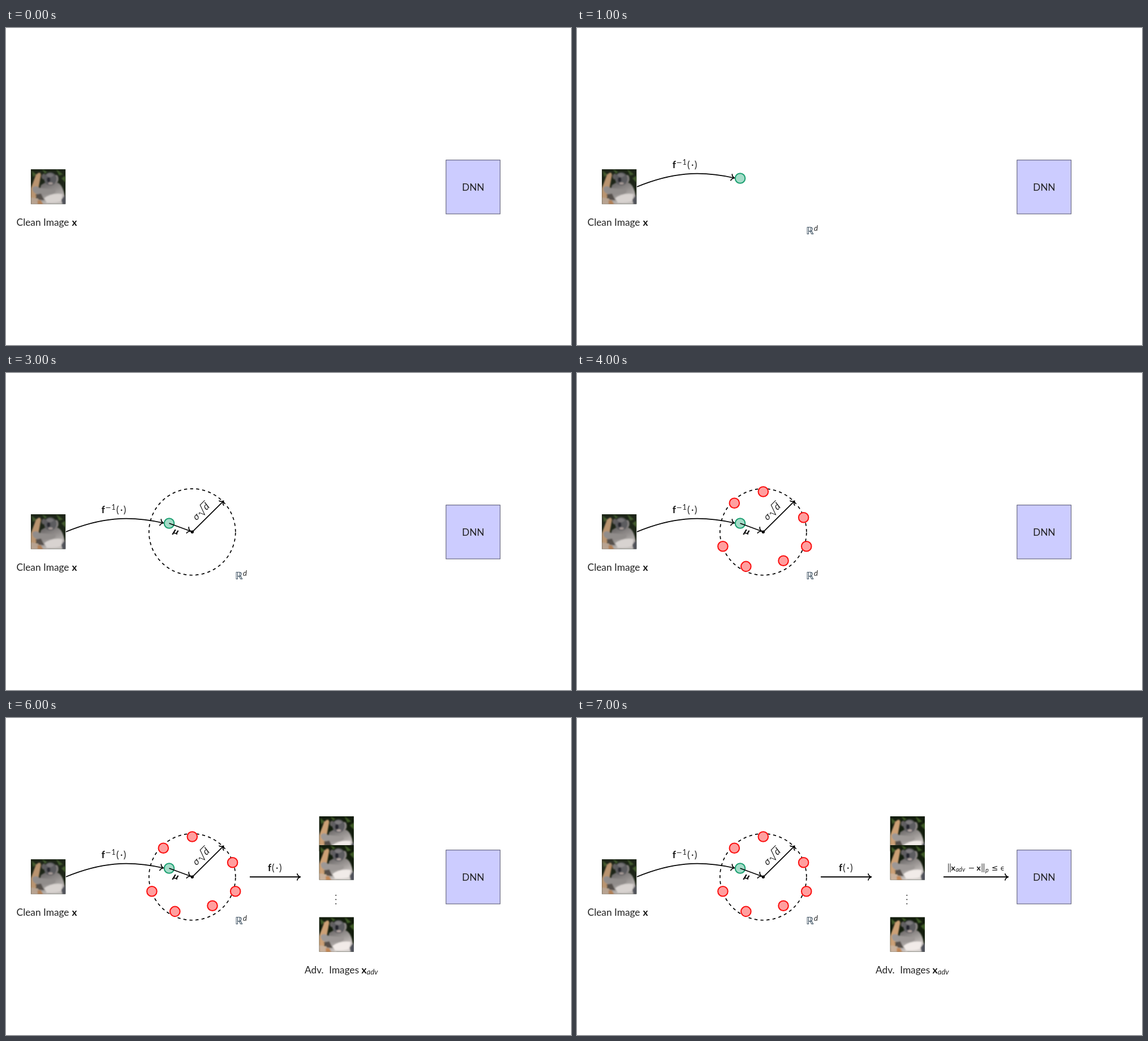
These frames come from a looping animation (999x561 px, 8000 ms). An HTML page:

```html
<!DOCTYPE html>
<html lang="en">
<head>
<meta charset="utf-8">
<title>Adversarial image sampling</title>
<style>
  html, body { margin: 0; width: 100%; height: 100%; overflow: hidden; background: #fff; }
  svg { display: block; width: 999px; height: 561px; }
  text { font: 17.3px Lato, "Open Sans", sans-serif; fill: #222; }
  .b { font-weight: 700; fill: #111; }
  .i { font-style: italic; }
  .sub { font-size: 13px; font-style: italic; }
  .small { font-size: 14px; }
  .tiny { font-size: 11px; font-style: italic; }
  .greek { font-family: "DejaVu Sans", sans-serif; font-style: italic; }
  .math { font-family: "DejaVu Sans", sans-serif; }
  .line { fill: none; stroke: #000; stroke-width: 1.7; }
  .arrow { marker-end: url(#tip); }
  .samples circle { r: 8.8px; fill: #ff9f9f; stroke: #fb0d0d; stroke-width: 2; }
  .adv { filter: brightness(1.06) contrast(1.12); }

  /* each step appears at once and stays until the loop restarts */
  .step { animation: 8s step-end infinite; }
  .s1 { animation-name: s1; }
  .s2 { animation-name: s2; }
  .s3 { animation-name: s3; }
  .s4 { animation-name: s4; }
  .s5 { animation-name: s5; }
  .s6 { animation-name: s6; }
  .s7 { animation-name: s7; }
  @keyframes s1 { 0% { opacity: 0 } 12.5%, 100% { opacity: 1 } }
  @keyframes s2 { 0% { opacity: 0 } 25%, 100% { opacity: 1 } }
  @keyframes s3 { 0% { opacity: 0 } 37.5%, 100% { opacity: 1 } }
  @keyframes s4 { 0% { opacity: 0 } 50%, 100% { opacity: 1 } }
  @keyframes s5 { 0% { opacity: 0 } 62.5%, 100% { opacity: 1 } }
  @keyframes s6 { 0% { opacity: 0 } 75%, 100% { opacity: 1 } }
  @keyframes s7 { 0% { opacity: 0 } 87.5%, 100% { opacity: 1 } }
</style>
</head>
<body>
<svg viewBox="0 0 999 561">
  <defs>
    <marker id="tip" markerUnits="userSpaceOnUse" markerWidth="12" markerHeight="16" orient="auto" overflow="visible">
      <path d="M-5.5-5.5C-5-2.8-1.6-.6 0 0C-1.6.6-5 2.8-5.5 5.5" fill="none" stroke="#000" stroke-width="1.7" stroke-linecap="round" stroke-linejoin="round"/>
    </marker>
    <linearGradient id="fur" x1="0" y1="0" x2=".5" y2="1">
      <stop offset="0" stop-color="#5f5c5c"/>
      <stop offset=".55" stop-color="#95918f"/>
      <stop offset="1" stop-color="#c5c0bd"/>
    </linearGradient>
    <filter id="soft"><feGaussianBlur stdDeviation=".8"/></filter>
    <clipPath id="frame"><rect width="61.5" height="61.5"/></clipPath>
    <g id="photo" clip-path="url(#frame)">
      <rect width="62" height="62" fill="#1d2518"/>
      <g filter="url(#soft)">
        <path d="M20 0L29 5L25 8ZM45 0L57 9L50 11ZM54 16L62 11V24ZM2 3L10 9L4 14Z" fill="#425b2d"/>
        <path d="M9 10Q17 2 18 10L14 32L9 52L0 56V34Z" fill="#b99470"/>
        <path d="M0 50L20 52L32 64H0Z" fill="#b7a391"/>
        <path d="M12 55L24 56L28 64H12Z" fill="#b07f55"/>
        <path d="M18 28Q34 16 50 25Q61 34 60 62H22Q12 48 18 28Z" fill="url(#fur)"/>
        <path d="M3 33Q8 27 16 33L42 36Q48 41 36 44L15 45Q3 43 3 33Z" fill="#918d8b"/>
        <path d="M8 45L18 43L24 55L14 54Z" fill="#55504c"/>
        <path d="M24 51Q38 41 56 44L54 56Q42 60 28 59Z" fill="#d8d3d0"/>
        <path d="M54 54L60 46L63 50V63H56Z" fill="#51535a"/>
        <ellipse cx="23" cy="13" rx="4" ry="5" fill="#625f5e"/>
        <ellipse cx="45" cy="17" rx="4" ry="7" fill="#858180"/>
        <ellipse cx="34.5" cy="17" rx="11" ry="11.5" fill="#5c5b5e"/>
        <path d="M27 10Q34 4 41 11L36 14H31Z" fill="#777477"/>
        <ellipse cx="31.5" cy="18.5" rx="3" ry="4.5" fill="#292a30"/>
        <ellipse cx="35" cy="25" rx="4" ry="2" fill="#a39794"/>
      </g>
    </g>
  </defs>

  <use href="#photo" x="43.8" y="250"/>
  <text y="349.7"><tspan x="18.6">Clean</tspan> <tspan x="66">Image</tspan> <tspan x="116.6" class="b">x</tspan></text>
  <rect x="778" y="233.7" width="95.7" height="95.3" fill="#ccccff" stroke="#52526a"/>
  <text x="826" y="287.5" text-anchor="middle">DNN</text>

  <g class="step s1">
    <path class="line arrow" d="M106 281C167 256 216 251.5 278.5 265.5"/>
    <text y="248"><tspan x="168.8" class="b">f</tspan><tspan x="175.5" y="242" class="math" style="font-size:12.5px">−</tspan><tspan x="186.5" y="241.5" style="font-size:12.5px">1</tspan><tspan x="195" y="248">(</tspan><tspan x="202">·</tspan><tspan x="207.7">)</tspan></text>
    <circle cx="288.5" cy="266" r="8.8" fill="#a4dcc8" stroke="#1a9f70" stroke-width="2"/>
    <text class="math" x="404.8" y="365" style="fill:#20374a">ℝ</text>
    <text class="sub" x="419" y="358.5">d</text>
  </g>

  <g class="step s2">
    <path class="line arrow" d="M288.5 266L326.5 280"/>
    <text class="greek b" transform="translate(294.5 283) rotate(20.5)" style="font-size:13.5px">μ</text>
  </g>

  <g class="step s3">
    <path class="line" d="M405.8 281.3A76.5 76.5 0 0 0 252.8 281.3A76.5 76.5 0 0 0 405.8 281.3" stroke-dasharray="5.377"/>
    <circle cx="329.3" cy="281.3" r="2.7"/>
    <path class="line arrow" d="M329.3 281.3L384.8 226.3"/>
    <g transform="translate(336.5 261.5) rotate(-45)">
      <text class="greek" style="font-size:15px">σ</text>
      <path class="line" d="M11.5-4.5L14-6.3L18 3L24.5-15H36" style="stroke-width:1"/>
      <text class="i" x="25.5">d</text>
    </g>
  </g>

  <g class="step s4 samples">
    <circle cx="329.3" cy="210"/>
    <circle cx="278.3" cy="230.3"/>
    <circle cx="400.6" cy="255.8"/>
    <circle cx="257.9" cy="306.8"/>
    <circle cx="405.7" cy="306.8"/>
    <circle cx="365" cy="332.3"/>
    <circle cx="298.8" cy="342.4"/>
  </g>

  <g class="step s5">
    <path class="line arrow" d="M431 281.3H520.5" style="stroke-width:2"/>
    <text y="270.5"><tspan x="463" class="b">f</tspan><tspan x="470">(</tspan><tspan x="477">·</tspan><tspan x="483">)</tspan></text>
  </g>

  <g class="step s6">
    <g class="adv">
      <use href="#photo" x="553.5" y="174"/>
      <use href="#photo" x="553.5" y="225"/>
      <use href="#photo" x="553.5" y="352.3"/>
    </g>
    <path d="M583.3 313.7v0M583.3 321.2v0M583.3 328.7v0" stroke="#222" stroke-width="2" stroke-linecap="round"/>
    <text y="451.7"><tspan x="528">Adv.</tspan> <tspan x="571.2">Images</tspan> <tspan x="628.6" class="b">x</tspan><tspan x="637.8" y="454.3" class="sub">adv</tspan></text>
  </g>

  <g class="step s7">
    <path class="line arrow" d="M648 281.3H762.5" style="stroke-width:2"/>
    <path class="line" d="M656.8 257.5V273M660 257.5V273M716.3 257.5V273M719.5 257.5V273" style="stroke-width:.9"/>
    <text class="small" y="269.5"><tspan x="661.5" class="b">x</tspan><tspan x="669.5" y="271.8" class="tiny">adv</tspan><tspan x="691.8" y="269.5" class="math">−</tspan><tspan x="706.5" class="b">x</tspan><tspan x="722" y="272.5" class="tiny">p</tspan><tspan x="733" y="269.5" class="math">≤</tspan><tspan x="748.8" class="math" style="font-size:12px">ϵ</tspan></text>
  </g>
</svg>
</body>
</html>
```
